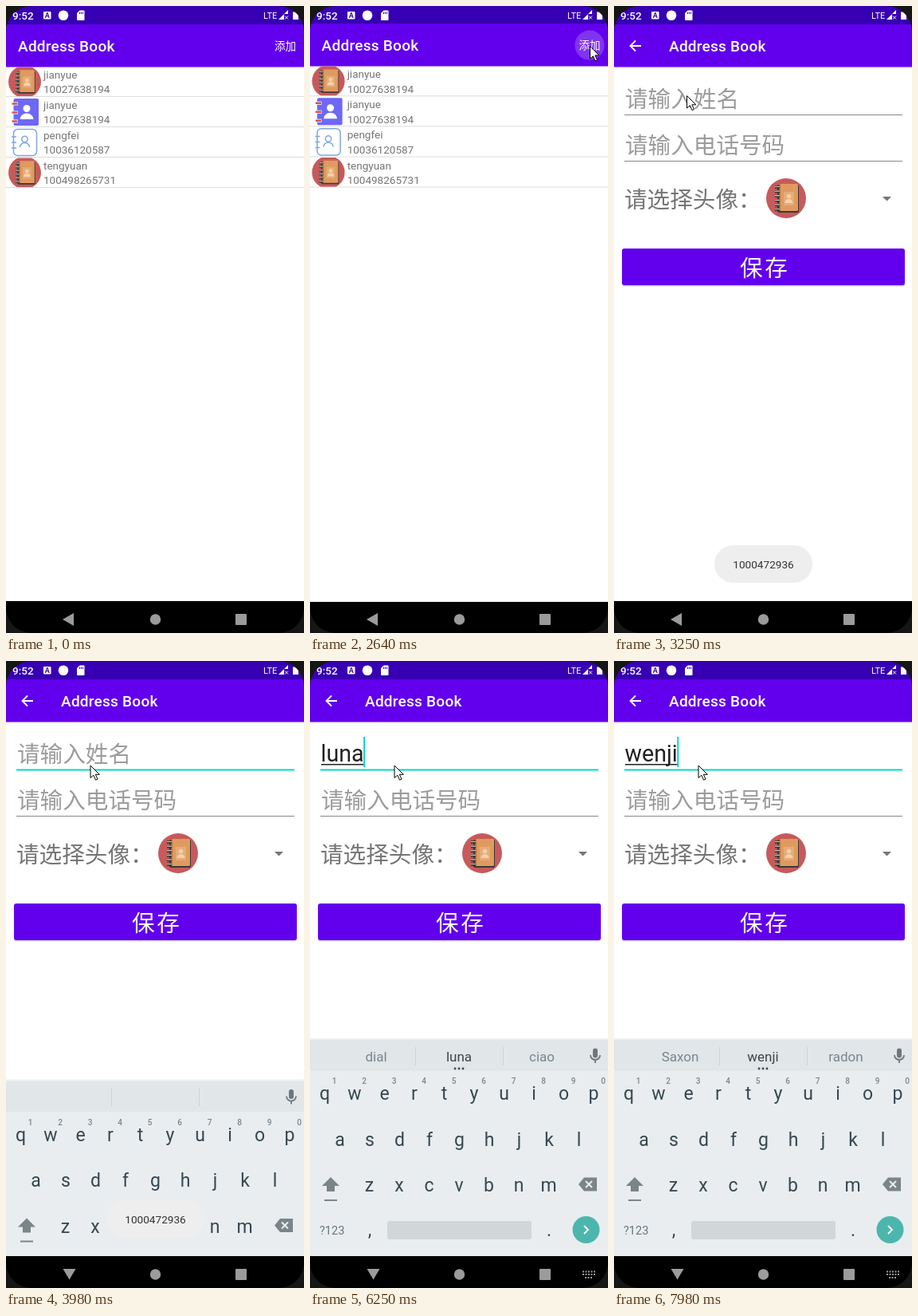
Animation of 374 by 786 pixels, one loop 8 s. Source, as an HTML page:

```html
<!DOCTYPE html>
<html lang="en">
<head>
<meta charset="utf-8">
<title>Address Book</title>
<style>
html, body { margin: 0; width: 100%; height: 100%; overflow: hidden; background: #fff; }
svg { display: block; width: 374px; height: 786px; font-family: Roboto, "Noto Sans CJK SC", "Noto Sans CJK", sans-serif; }
.mid { text-anchor: middle; }
.title { font-size: 19px; font-weight: 500; letter-spacing: .24px; fill: #fff; }
.row { font-size: 13.5px; fill: #757575; }
.big { font-size: 28.6px; }
.hint { fill: #9c9c9c; }
.key { font-size: 23px; fill: #37474f; }
.num { font-size: 10px; font-weight: 500; fill: #7b8488; }
.word { font-size: 17px; fill: #78868d; }
</style>
</head>
<body>
<svg viewBox="0 0 374 786">
  <defs>
    <g id="book">
      <circle r="25" fill="#c75a5a"/>
      <rect x="-11" y="-17" width="27" height="35" rx="2" fill="#3b3838"/>
      <rect x="-9" y="-18" width="24" height="34" rx="1.5" fill="#df9a5f"/>
      <path d="M-8-18v34" stroke="#b9743f" stroke-width="2"/>
      <path d="M-14-14h6m-6 5.6h6m-6 5.6h6m-6 5.6h6m-6 5.6h6m-6 5.6h6" stroke="#3b3838" stroke-width="3.6"/>
      <path d="M-14-14.500h6m-6 5.6h6m-6 5.6h6m-6 5.6h6m-6 5.6h6m-6 5.6h6" stroke="#cfc6c2" stroke-width="1.2"/>
      <rect x="-3" y="-8" width="13" height="17" fill="#e6ab76"/>
      <g fill="#f3d2ab"><circle cx="3.5" cy="-2.5" r="2.8"/><path d="M-1.5 6a5 5 0 0 1 10 0z"/></g>
    </g>
    <g id="bar">
      <path d="M0 76h374v690h-374z" fill="#fff"/>
      <path d="M0 76.400h374v1h-374z" opacity=".08"/>
      <path d="M0 23h374v53.400h-374z" fill="#6200ee"/>
    </g>
    <clipPath id="rowClip"><path d="M0-18.5h60v37h-60z"/></clipPath>
  </defs>

  <rect width="374" height="23" fill="#3700b3"/>
  <g fill="#fff">
    <text x="8" y="17" font-size="13.5" font-weight="500">9:52</text>
    <rect x="47" y="7" width="9.5" height="9.5" rx="1"/>
    <text class="mid" x="51.7" y="15" font-size="9" font-weight="700" style="fill:#3700b3">A</text>
    <circle cx="72" cy="11.7" r="6.3"/>
    <path d="M92.500 5.500h5q1 0 1 1v10.500q0 1-1 1h-7.500q-1 0-1-1v-8z"/>
    <path d="M92.500 7.500v2.500m2-2.500v2.500m2-2.500v2.500" stroke="#3700b3"/>
    <text x="323" y="15.500" font-size="11">LTE</text>
    <path d="M342 17l12-12v5h-5v7z"/>
    <path d="M350 12.500l4 4m0-4l-4 4" stroke="#fff"/>
    <path d="M360 7.500h2v-1.500h3v1.500h2v9.500h-7z"/>
  </g>

  <g id="list">
    <use href="#bar"/>
    <circle id="ripple" cx="350.500" cy="50" fill="#fff" opacity=".2"/>
    <text class="title" x="15" y="57">Address Book</text>
    <text x="337" y="54.800" font-size="13.500" fill="#fff">添加</text>
    <g id="rows"></g>
  </g>

  <g id="form">
    <use href="#bar"/>
    <path d="M34 50h-13.500m6.500-6.500l-6.500 6.500 6.500 6.500" fill="none" stroke="#fff" stroke-width="1.800"/>
    <text class="title" x="69" y="57">Address Book</text>
    <text id="hint" class="big hint" x="14" y="126.500">请输入姓名</text>
    <text id="typed" class="big" x="13.500" y="126" fill="#212121"></text>
    <rect id="compose" x="14" y="129" height="1.500" fill="#212121"/>
    <rect id="caret" y="95" width="2" height="38" fill="#03dac5"/>
    <path id="line" d="M13 136.500h349" stroke="#888"/>
    <text class="big hint" x="14" y="185">请输入电话号码</text>
    <path d="M13 194.500h349" stroke="#888"/>
    <text class="big" x="13" y="252.500" fill="#757575">请选择头像：</text>
    <use href="#book" x="216" y="241"/>
    <path d="M337 239h11l-5.500 5.500z" fill="#757575"/>
    <rect x="10" y="305" width="355" height="46.500" rx="3" opacity=".2"/>
    <rect x="10" y="304" width="355" height="46" rx="3" fill="#6200ee"/>
    <text class="big" x="158" y="339" fill="#fff" letter-spacing="2.550">保存</text>
  </g>

  <g id="board">
    <path d="M0 473h374v2h-374z" opacity=".06"/>
    <path d="M0 475h374v275h-374z" fill="#e9edf0"/>
    <path d="M0 475h374v38.500h-374z" fill="#e1e6e9"/>
    <path d="M132.500 484v23m110-23v23" stroke="#cdd3d6"/>
    <g id="words"></g>
    <g id="dots" fill="#37474f"><circle cx="182" cy="511" r="1.400"/><circle cx="187" cy="511" r="1.400"/><circle cx="192" cy="511" r="1.400"/></g>
    <rect x="355" y="485.500" width="6" height="12" rx="3" fill="#6c777c"/>
    <path d="M352 494a6 6 0 0 0 12 0m-6 6v4" fill="none" stroke="#6c777c" stroke-width="1.800"/>
    <g id="keys"></g>
    <path d="M26 647l11 11h-6v7h-10v-7h-6z" fill="#7b8488"/>
    <path d="M18 676h16" stroke="#7b8488" stroke-width="2"/>
    <path d="M344 647.500h16v17h-16l-7-8.500z" fill="#7b8488"/>
    <path d="M346 652l8 8m0-8l-8 8" stroke="#e9edf0" stroke-width="2"/>
    <text x="12" y="719" font-size="14.500" fill="#6a767c">?123</text>
    <rect x="97" y="702" width="181" height="23" rx="3" fill="#d1d6d9"/>
    <circle cx="346.500" cy="713" r="17" fill="#4db6ac"/>
    <path d="M344 708l5 5-5 5" fill="none" stroke="#fff" stroke-width="2"/>
  </g>

  <rect id="navBg" y="746" width="374" height="40"/>
  <g fill="#9b9b9b">
    <path id="back" d="M71 769l14-8v16z"/>
    <path id="down" d="M71.500 762h16l-8 13.500z"/>
    <circle cx="187.500" cy="769" r="6.700"/>
    <rect x="288" y="762" width="14" height="14" rx="1"/>
    <path id="boardIcon" d="M342 765.500h16m-16 3.500h16m-13 4h10" stroke="#9b9b9b" stroke-width="2" stroke-dasharray="2 1.500"/>
  </g>

  <g id="toast">
    <rect x="126" y="676" width="123" height="47" rx="23.500" fill="#eee"/>
    <text class="mid" x="187.500" y="705" font-size="13.600" fill="#333">1000472936</text>
  </g>
  <path d="M0 0h374v786h-374zM32 0a32 32 0 0 0-32 32v722a32 32 0 0 0 32 32h310a32 32 0 0 0 32-32v-722a32 32 0 0 0-32-32z" fill="#161616" fill-rule="evenodd"/>
  <path id="cursor" d="M.5.5v15.500l3.800-3.300 2.700 6 2.500-1.200-2.700-5.700h5z" fill="#fff" stroke="#000"/>
</svg>
<script>
const $ = id => document.getElementById(id);
const set = (id, name, value) => $(id).setAttribute(name, value);
const show = (id, on) => set(id, 'visibility', on ? 'visible' : 'hidden');
const ramp = (t, from, to) => Math.min(1, Math.max(0, (t - from) / (to - from)));
const easeOut = p => 1 - (1 - p) ** 3;
const label = (cls, x, y, s) => `<text class="${cls}" x="${x}" y="${y}">${s}</text>`;

// Contact list
const icons = [
  '<use href="#book" transform="translate(23.5) scale(.82)"/>',
  `<rect x="9.500" y="-17" width="31.500" height="34" rx="2" fill="#6d68f5"/>
   <g fill="#fff"><circle cx="26" cy="-4.500" r="4.500"/><path d="M17.500 9a8.500 7.500 0 0 1 17 0z"/></g>
   <path d="M7-10.500h8m-8 11h8m-8 11h8" stroke="#fff" stroke-width="4"/>
   <path d="M7.500-10.500h7m-7 11h7m-7 11h7" stroke="#d0545c" stroke-width="2.500"/>`,
  `<g fill="none" stroke="#7fa6e0" stroke-width="1.500"><rect x="9.500" y="-16.500" width="29" height="33" rx="5"/>
   <circle cx="23.500" cy="-4" r="3.700"/><path d="M17.500 6a6 5.500 0 0 1 12 0M7-7h6m-6 7h6m-6 7h6"/></g>`
];
const contacts = [
  ['jianyue', '10027638194', 0], ['jianyue', '10027638194', 1],
  ['pengfei', '10036120587', 2], ['tengyuan', '100498265731', 0]
];
$('rows').innerHTML = contacts.map(([name, phone, icon], i) =>
  `<g transform="translate(0 ${95 + 38 * i})"><g clip-path="url(#rowClip)">${icons[icon]}</g>
   ${label('row', 47, -4, name)}${label('row', 47, 14.4, phone)}
   <path d="M0 18.500h380" stroke="#dcdcdc"/></g>`).join('');

// Keyboard
const keyRow = (chars, x, y, cls = 'key mid') =>
  [...chars].map((c, i) => label(cls, x + 37.5 * i, y, c)).join('');
$('keys').innerHTML = keyRow('qwertyuiop', 18.5, 550) + keyRow('1234567890', 30.5, 530, 'num mid') +
  keyRow('asdfghjkl', 37.5, 607.5) + keyRow('zxcvbnm', 74.5, 665) +
  label('key mid', 75, 721, ',') + label('key mid', 300, 721, '.');

// Time, typed text, left and right suggestion
const typing = [
  [4220, ''], [5280, 'l', 'la', 'le'], [5520, 'lu', 'lit', 'la'],
  [5850, 'lun', 'lung', 'line'], [6180, 'luna', 'dial', 'ciao'],
  [6720, 'lun', 'lung', 'line'], [6850, 'lu', 'lit', 'la'], [6980, 'l', 'la', 'le'],
  [7260, ''], [7460, 'w', 'we', 'a'], [7590, 'we', 'were', 'well'],
  [7720, 'wen', 'went', 'when'], [7830, 'wenj', 'went', 'when'], [7930, 'wenji', 'Saxon', 'radon']
];

// Time, x, y of the pointer
const path = [
  [910, 274, 786], [1010, 262, 720], [1100, 243, 660], [1250, 205, 380], [1420, 150, 61],
  [1570, 68, 110], [1710, 128, 124], [1770, 201, 92], [1830, 201, 92], [1840, 315, 59],
  [1900, 315, 59], [2100, 362, 55], [2170, 351, 51], [2700, 351, 50], [3180, 128, 90],
  [3240, 91, 112], [3310, 91, 112], [3420, 100, 86], [3640, 105.5, 130.5], [8000, 105.5, 130.5]
];
function pointer(t) {
  const i = Math.max(1, path.findIndex(p => p[0] > t));
  const [a, b] = [path[i - 1], path[i]];
  const p = ramp(t, a[0], b[0]);
  return [a[1] + (b[1] - a[1]) * p, a[2] + (b[2] - a[2]) * p];
}

let lastStep;
function drawText(t) {
  const step = typing.findLast(k => k[0] <= t) || [0, ''];
  const [time, text, left = '', right = ''] = step;
  if (step !== lastStep) {
    lastStep = step;
    $('typed').textContent = text;
    $('words').innerHTML = label('word mid', 83, 502, left) + label('word mid', 291, 502, right) +
      `<g style="filter:brightness(.5)">${label('word mid', 187, 502, text)}</g>`;
  }
  const width = text ? $('typed').getComputedTextLength() : 0;
  set('compose', 'width', width);
  set('caret', 'x', 13 + width);
  show('hint', !text);
  show('dots', text);
  show('caret', time && (t - time) % 1000 < 500);
}

function draw() {
  const t = performance.now() % 8000;

  // The opening page grows slightly around the stage centre
  const pressed = t >= 2430 && t < 2720;
  set('list', 'transform', pressed ? 'translate(-.5 -1.05) scale(1.0027)' : '');
  set('navBg', 'y', pressed ? 747 : 746);
  set('ripple', 'r', pressed ? 18.5 * easeOut(ramp(t, 2430, 2600)) : 0);

  const open = easeOut(ramp(t, 2720, 3020));
  set('form', 'opacity', open);
  set('form', 'transform', `translate(0 ${30 * (1 - open)})`);

  const focused = t >= 3700;
  set('line', 'stroke', focused ? '#03dac5' : '#888');
  set('line', 'stroke-width', focused ? 2 : 1);
  set('board', 'transform', `translate(0 ${275 * (1 - easeOut(ramp(t, 3780, 4250)))})`);
  show('board', t >= 3780);
  show('back', t < 3850);
  show('down', t >= 3850);
  show('boardIcon', t >= 4180);
  drawText(t);

  set('toast', 'opacity', ramp(t, 3000, 3180) * (1 - ramp(t, 4770, 4980)));
  show('cursor', t >= 910 && !(t >= 1900 && t < 2100));
  set('cursor', 'transform', `translate(${pointer(t)})`);
  requestAnimationFrame(draw);
}
draw();
</script>
</body>
</html>
```
